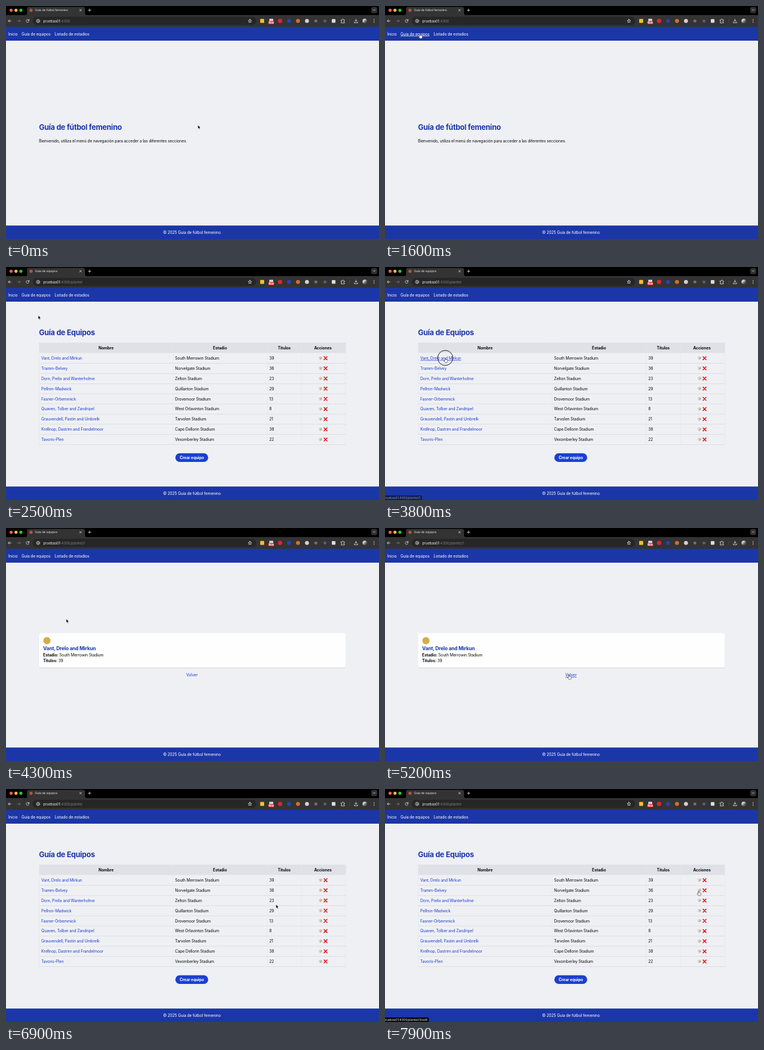
An HTML page that plays this animation: 656x410 px, repeating every 8000 ms.

```html
<!DOCTYPE html>
<html lang="es">
<head>
<meta charset="utf-8">
<title>Guía de fútbol femenino</title>
<style>
html, body { margin: 0; width: 100%; height: 100%; overflow: hidden; background: #eff0f4; }
svg { display: block; width: 100vw; height: 100vh; }
text { font: 6.94px Inter, Roboto, sans-serif; letter-spacing: -.02em; fill: #0b0b0d; white-space: pre; }
.b { font-weight: 700; letter-spacing: -.015em; }
.h1 { font-size: 13.02px; font-weight: 700; letter-spacing: -.021em; fill: #1b36a7; }
.h2 { font-size: 8.7px; font-weight: 700; letter-spacing: -.021em; fill: #1b36a7; }
.w { fill: #fff; }
.link { fill: #1c3fcd; }
.tab { font-size: 5.35px; fill: #e8e8e8; }
.url { font-size: 6.1px; letter-spacing: 0; fill: #f0f0f0; }
.status { font-size: 5.4px; letter-spacing: 0; fill: #f4f4f4; }
.mid { text-anchor: middle; }
.line { fill: none; stroke: #d8d8d8; stroke-width: .9; stroke-linecap: round; stroke-linejoin: round; }
</style>
</head>
<body>
<svg id="stage" viewBox="0 0 656 410" preserveAspectRatio="none"></svg>
<script>
const LOOP = 8000;
const HOST = 'pruebas01', PORT = ':4300';
const BLUE = '#1b36a7';

const teams = [
  ['Vant, Drelo and Mirkun', 'South Merrowin Stadium', 39],
  ['Tramm-Belvey', 'Norvelgate Stadium', 36],
  ['Dorn, Prelix and Wanterholme', 'Zelton Stadium', 23],
  ['Pellron-Madwick', 'Quillanton Stadium', 29],
  ['Fasner-Orbemmick', 'Drovemoor Stadium', 13],
  ['Quaven, Tolber and Zandripel', 'West Orlavinton Stadium', 8],
  ['Grauvendell, Pastin and Umbrelk', 'Tarvolen Stadium', 21],
  ['Krellnop, Dastrim and Frandelmoor', 'Cape Dellorin Stadium', 38],
  ['Tavoris-Plen', 'Vexomberley Stadium', 22]
];

const text = (x, y, s, cls = '', id = '') =>
  `<text x="${x}" y="${y}" class="${cls}"${id && ` id="${id}"`}>${s}</text>`;
const rect = (x, y, w, h, fill, r = 0) =>
  `<rect x="${x}" y="${y}" width="${w}" height="${h}" rx="${r}" fill="${fill}"/>`;
const dot = (x, y, r, fill) => `<circle cx="${x}" cy="${y}" r="${r}" fill="${fill}"/>`;
const line = d => `<path class="line" d="${d}"/>`;

function chrome() {
  return rect(0, 0, 656, 16, '#000') +
    rect(0, 16, 656, 21, '#333') +
    '<path d="M34 16q3 0 3-3V5q0-3.500 3.500-3.500H135.500q3.500 0 3.500 3.500v8q0 3 3 3z" fill="#333"/>' +
    dot(9, 7.5, 2.7, '#fe5f57') + dot(17.6, 7.5, 2.7, '#febc2e') + dot(26.2, 7.5, 2.7, '#28c840') +
    dot(44, 7.5, 2.8, '#b4563f') +
    text(51, 9.4, '', 'tab', 'tab') +
    line('M129.500 5.800l3.200 3.200m0-3.200l-3.200 3.200M144.700 7.400h4.600m-2.300-2.300v4.600') +
    rect(642.2, 1.8, 10.6, 10.6, '#333', 3.5) + line('M645.800 6.300l1.700 1.700l1.700-1.700') +
    rect(47, 19, 393, 14.5, '#262626', 7.2) +
    line('M9 26.300H4m2.300-2.300l-2.300 2.300l2.300 2.300') +
    `<g opacity=".4">${line('M20 26.300h5m-2.300-2.300l2.300 2.300l-2.300 2.300')}</g>` +
    line('M40.300 25.200a2.500 2.500 0 1 0 .1 1.900M40.600 23.400v2h-2') +
    dot(56.5, 26.3, 4.6, '#363636') +
    '<circle cx="56.500" cy="26.300" r="2.600" class="line" stroke-width=".7"/>' +
    line('M56.500 26.200v1.300M56.500 24.900v.01') +
    `<text x="65.5" y="28.500" class="url">${HOST}<tspan id="path" fill="#808080"></tspan></text>` +
    line('M429 23.200l.9 2l2.200.2l-1.700 1.500l.5 2.200l-1.900-1.200l-1.900 1.200l.5-2.200l-1.700-1.500l2.200-.2z') +
    rect(447, 22.8, 7, 7, '#f5bd31', 1) +
    rect(463, 22.5, 7, 5, '#d8d8d8', .8) + rect(461.5, 26.5, 10, 5.5, '#e02d2a', 1) +
    '<text x="466.500" y="30.800" class="w mid b" style="font-size:4.2px">New</text>' +
    dot(482, 26.3, 3.8, '#d92635') + dot(497.7, 26.3, 3.5, '#2541b8') +
    dot(513.5, 26.3, 3.5, '#d46d2d') + dot(529.3, 26.3, 3.5, '#d9cccf') +
    dot(545, 26.3, 2.6, '#756a83') + dot(561, 26.3, 2.6, '#4f5f86') +
    rect(573, 23, 6.4, 6.6, '#dcdcdc', 1) +
    line('M589.500 24.500h1.700q0-1.700 1.200-1.700t1.200 1.700h1.700v1.800q-1.500 0-1.500 1t1.500 1v1.500h-5.800v-1.700q1.300-.1 1.300-1t-1.300-1z') +
    rect(604.5, 23.5, .6, 6, '#5b5b5b') +
    line('M615.500 23v4m-1.800-1.700l1.800 1.800l1.800-1.800M612.500 27.800v1.700h6v-1.700') +
    dot(631, 26.3, 4, 'url(#avatar)') +
    [23.8, 26.3, 28.8].map(y => dot(647.3, y, .75, '#ddd')).join('');
}

function frame() {
  return rect(0, 36.6, 656, 24.4, BLUE) +
    text(4, 51.6, 'Inicio', 'w') + text(27.2, 51.6, 'Guía de equipos', 'w', 'nav') +
    text(85.5, 51.6, 'Listado de estadios', 'w') +
    rect(0, 386.3, 656, 23.7, BLUE) +
    text(327, 401.4, '© 2025 Guía de fútbol femenino', 'w mid');
}

function home() {
  return text(58, 218, 'Guía de fútbol femenino', 'h1') +
    text(58, 239.5, 'Bienvenido, utiliza el menú de navegación para acceder a las diferentes secciones.');
}

function actions(y) {
  return `<g transform="translate(553 ${y})">` +
    '<path d="M-2.700-1.500l3.700-1.400l1.900 3.700l-3.700 2z" fill="#ddd6c9" stroke="#aaa092" stroke-width=".4"/>' +
    '<path d="M-.3 1.300l2.700-2.900" stroke="#b98a55" stroke-width="1.100"/></g>' +
    `<path d="M559.300 ${y - 2.7}l5.400 5.400m0-5.400l-5.400 5.400" stroke="#d9141e" stroke-width="1.600" stroke-linecap="round"/>`;
}

function list() {
  const heads = [['Nombre', 176], ['Estadio', 376.3], ['Títulos', 489.3], ['Acciones', 557.3]];
  let s = text(58, 119.7, 'Guía de Equipos', 'h1') + rect(58, 133, 540, 18.3, '#dfe1e6');
  s += heads.map(([h, x]) => text(x, 145, h, 'b mid')).join('');
  teams.forEach(([name, ground, titles], i) => {
    const y = 160.4 + i * 17.9;
    s += text(62, y + 2.5, name, 'link', i ? '' : 'team') + text(297.3, y + 2.5, ground) +
      text(463, y + 2.5, titles) + actions(y) + rect(58, y + 8.7, 540, .6, '#cfd2d8');
  });
  s += [58, 293.7, 459, 519, 597.5].map(x => rect(x, 133, .5, 179.7, '#e5e7eb')).join('');
  return s + rect(297.8, 327.7, 57.8, 15.4, '#1a40d2', 7.7) + text(326.8, 338, 'Crear equipo', 'b w mid');
}

function detail() {
  const [name, ground, titles] = teams[0];
  const field = (y, k, v) => `<text x="65.300" y="${y}"><tspan class="b">${k}:</tspan> ${v}</text>`;
  return rect(58, 186.3, 539.5, 60.5, '#d5d7dc', 3.5) + rect(57.6, 185.7, 540.3, 60.3, '#e3e5e9', 3.5) +
    rect(58, 185, 539.5, 60.3, '#fefefe', 3.5) +
    dot(72, 198.3, 6.3, '#d3ad48') +
    text(65.3, 214.8, name, 'h2') +
    field(225.6, 'Estadio', ground) + field(236, 'Títulos', titles) +
    text(327, 261, 'Volver', 'link mid', 'back');
}

function pointers() {
  return '<circle id="ring" r="13.300" fill="none" stroke="#15151c" stroke-width="1"/>' +
    '<path id="arrow" d="M0 0v6.500l1.500-1.300l1 2.300l1.200-.5l-1-2.200h2z" fill="#000" stroke="#fff" stroke-width=".5"/>' +
    '<path id="hand" d="M-.7.600q.7-1 1.400 0v2.300q.9-.5 1.300.2q.9-.4 1.200.3q1-.2 1 .7v1.500q0 1.900-1.200 2.600h-3.200q-1-1.400-2.500-3.200q.4-1.100 2 .1z" fill="#fff" stroke="#111" stroke-width=".6"/>';
}

const $ = id => document.getElementById(id);
$('stage').innerHTML =
  '<defs><linearGradient id="avatar" x1="0" x2="1" y2="1"><stop offset=".3" stop-color="#d2d6da"/><stop offset=".7" stop-color="#50535b"/></linearGradient></defs>' +
  rect(0, 0, 656, 410, '#eff0f4') + chrome() + frame() +
  `<g id="home">${home()}</g><g id="list">${list()}</g><g id="detail">${detail()}</g>` +
  '<g id="status"><rect id="box" x="-3" y="402" height="11" rx="2" fill="#050506"/>' +
  text(-2.6, 408.1, '', 'status', 'hint') + '</g>' + pointers();

// start, page, tab title, address path
const views = [
  [0, 'home', 'Guía de fútbol femenino', ''],
  [2000, 'list', 'Guía de equipos', '/plantel'],
  [4000, 'detail', 'Guía de equipos', '/plantel/1'],
  [5900, 'list', 'Guía de equipos', '/plantel']
];
// time, x, y
const track = [
  [0, 337.5, 209.5], [100, 337.5, 209.5], [700, 112, 84], [900, 112, 84],
  [1500, 61.5, 49], [2100, 61.5, 49], [2500, 56.7, 85.3], [2700, 56.7, 85.3],
  [3600, 106, 160], [4500, 106, 160], [5150, 323.5, 258], [5900, 323.5, 258],
  [6080, 325.5, 261.3], [6600, 325.5, 261.3], [7100, 555, 172], [7500, 555, 172],
  [7700, 551.5, 179.5], [LOOP, 551.5, 179.5]
];
// start, end, underlined element
const hovers = [[1400, 2200, 'nav'], [3450, 4000, 'team'], [5080, 5900, 'back'], [7580, LOOP, '']];
const clicks = [[1750, 1950], [3700, 3920], [5700, 5880]];
// start, end, path, box width
const hints = [
  [1680, 2000, '/plantel', 60], [3700, 4100, '/plantel/1', 65],
  [5380, 6300, '/plantel', 60], [7560, LOOP + 500, '/plantel/3/edit', 77]
];

const clamp = v => Math.max(0, Math.min(1, v));
const ease = v => v * v * (3 - 2 * v);
const during = (t, [a, b]) => t >= a && t < b;
const show = (id, on) => $(id).setAttribute('visibility', on ? 'visible' : 'hidden');

function cursorAt(t) {
  const i = Math.max(1, track.findIndex(k => k[0] > t));
  const [a, x0, y0] = track[i - 1], [b, x1, y1] = track[i];
  const p = ease(clamp((t - a) / (b - a)));
  return [x0 + (x1 - x0) * p, y0 + (y1 - y0) * p];
}

function render(t) {
  const [, page, title, path] = views.filter(v => v[0] <= t).pop();
  ['home', 'list', 'detail'].forEach(id => show(id, id === page));
  $('tab').textContent = title;
  $('path').textContent = PORT + path;

  const hover = hovers.find(h => during(t, h));
  ['nav', 'team', 'back'].forEach(id =>
    $(id).setAttribute('text-decoration', hover && hover[2] === id ? 'underline' : 'none'));

  const at = `translate(${cursorAt(t)})`;
  ['arrow', 'hand', 'ring'].forEach(id => $(id).setAttribute('transform', at));
  show('arrow', !hover);
  show('hand', hover);
  show('ring', clicks.some(c => during(t, c)));

  const hint = hints.find(h => during(t, h));
  show('status', hint);
  if (hint) {
    const [a, b, to, w] = hint;
    $('hint').textContent = HOST + PORT + to;
    $('box').setAttribute('width', w + 3);
    $('status').setAttribute('opacity', Math.min(clamp((t - a) / 200), clamp((b - t) / 150)));
  }
}

const begin = performance.now();
function tick() {
  render((performance.now() - begin) % LOOP);
  requestAnimationFrame(tick);
}
tick();
</script>
</body>
</html>
```
